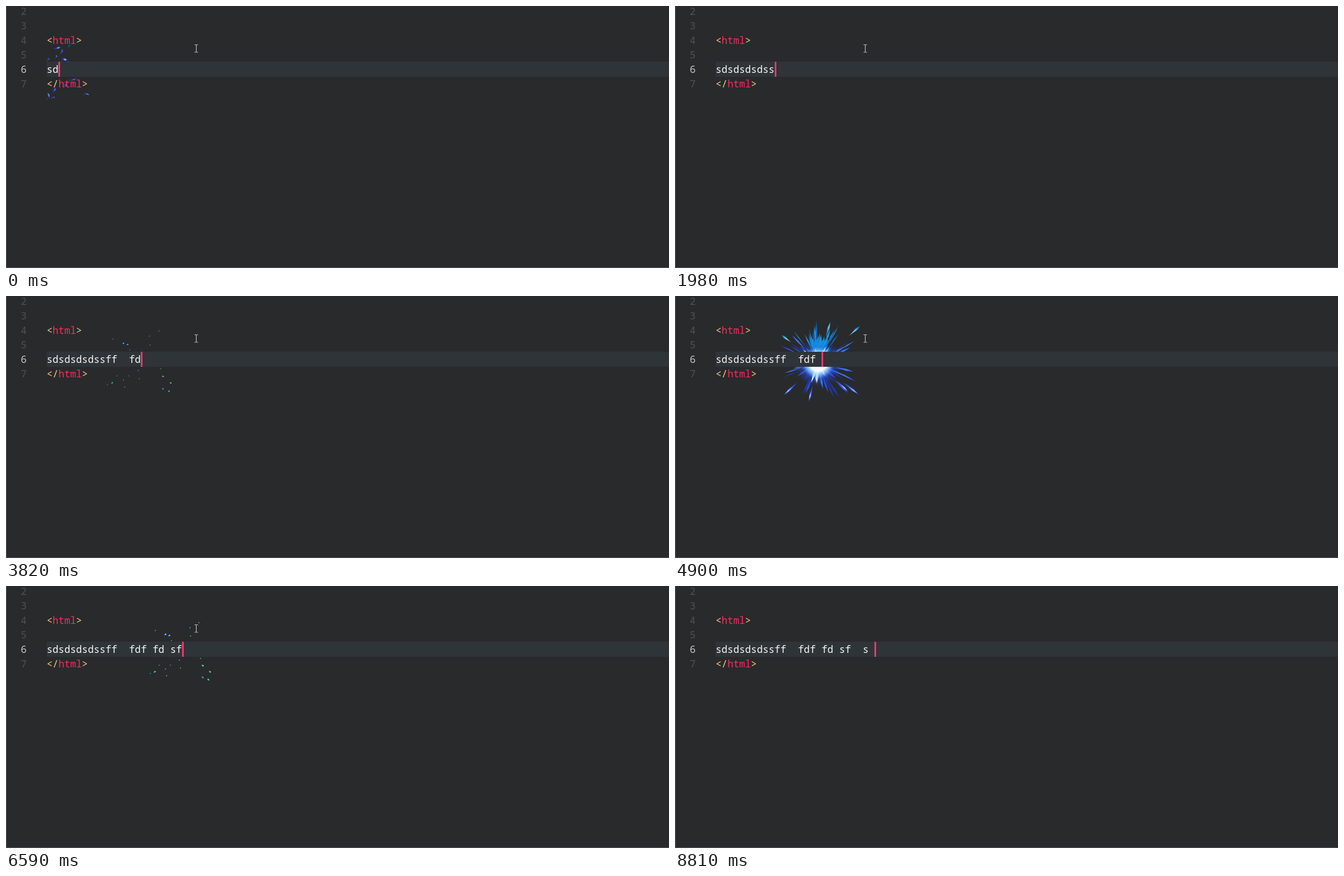
Write an HTML page with a canvas that moves like this. It is 1190x470 px and loops after 9200 ms.

```html
<!DOCTYPE html>
<html lang="en">
<head>
<meta charset="utf-8">
<title>Explosive typing</title>
<style>
  html, body { margin: 0; width: 100%; height: 100%; overflow: hidden; background: #292a2c; }
  canvas, svg { position: absolute; left: 0; top: 0; width: 1190px; height: 470px; }
  text { font: 17.6px "Noto Sans Mono", "DejaVu Sans Mono", monospace; white-space: pre; }
  .num { fill: #505153; }
  .on { fill: #c4c5c7; }
  .mark { fill: #ffc580; }
  .tag { fill: #f92b60; }
  #typed { fill: #f6f6f2; }
</style>
</head>
<body>
<canvas id="fx" width="1190" height="470"></canvas>
<svg viewBox="0 0 1190 470">
  <rect x="73" y="100" width="1117" height="27" fill="#2f3439"/>
  <rect width="1" height="470" fill="#55565a"/>
  <rect y="469" width="1190" height="1" fill="#55565a"/>
  <g id="gutter"></g>
  <text x="73" y="68" class="mark">&lt;<tspan class="tag">html</tspan>&gt;</text>
  <text x="73" y="146" class="mark">&lt;/<tspan class="tag">html</tspan>&gt;</text>
  <text id="typed" x="73" y="120"></text>
  <rect id="caret" y="100" width="3" height="27" fill="#f0386c"/>
  <path id="mouse" d="M338.5 69.5h2.5l.5 .5 .5-.5h2.5M341.5 70v12.500M338.500 83h2.500l.500-.500 .500 .500h2.500" fill="none" stroke="#d4d4d4"/>
</svg>
<script>
const LOOP = 9200, LIFE = 1100, CHAR = 10.56, LEFT = 73, MID = 120;
const BG = '#292a2c';
const LINE = 'sdsdsdsdssff  fdf fd sf  s ';

// Moments at which the 3rd, 4th, ... character appears
const KEYS = [270, 530, 790, 930, 1060, 1190, 1320, 1700, 2050, 2500, 3000, 3500,
  3670, 3800, 4390, 4640, 5170, 5440, 5700, 6130, 6430, 6850, 7270, 7650, 8150];
const BLASTS = [-825, 300, 780, 2014, 2772, 3875, 4650, 5570, 6690, 7640];
// Screen updates: [start, number of steps until the next start]
const BEATS = [[0, 1], [140, 8], [1200, 9], [2370, 9], [3540, 8], [4650, 8],
  [5750, 8], [6860, 8], [7920, 7], [8810, 1], [LOOP, 1]];

const BLUES = ['#1238c0', '#1b50e8', '#2769f8', '#3796ff', '#62d0ff', '#b4f0ff'];
const STREAKS = [[22, -74], [75, -66], [-62, 58], [-17, 69], [54, 52], [73, 57], [-66, -50]];
// x, y, width, height
const SHARDS = [[5, -45, 10, 4], [12, -39, 3, 10], [25, -49, 2, 5], [17, -24, 9, 6],
  [-12, -25, 3, 5], [24, -20, 5, 2], [-12, 40, 3, 13], [-1, 30, 4, 9], [-3, 44, 6, 3],
  [57, 38, 10, 2.5], [33, 12, 11, 3], [19, 22, 5, 7], [2, -30, 2, 6]];
const SPARKS = [[-42, -40], [-24, -33], [-17, -31], [-13, -22], [20, -45], [36, -54],
  [21, -30], [-51, 37], [-43, 34], [-22, 41], [-24, 29], [-15, 22], [3, 27], [43, 23],
  [56, 34], [43, 44], [53, 48], [1, 13], [39, 10], [-35, 22]];

const $ = id => document.getElementById(id);
const g = $('fx').getContext('2d');
const clamp = (v, a = 0, b = 1) => Math.min(b, Math.max(a, v));

function random(seed) {
  return () => {
    seed = (seed * 16807) % 2147483647;
    return seed / 2147483647;
  };
}

function glow(r, stops) {
  const fill = g.createRadialGradient(0, 0, 0, 0, 0, r);
  stops.forEach(([at, color]) => fill.addColorStop(at, color));
  g.fillStyle = fill;
  g.beginPath();
  g.arc(0, 0, r, 0, 7);
  g.fill();
}

function blob(x, y, w, h, turn, color) {
  g.fillStyle = color;
  g.beginPath();
  g.ellipse(x, y, w / 2, h / 2, turn, 0, 7);
  g.fill();
}

// Thin kite pointing away from the middle
function ray(a, r1, r2, w, color) {
  g.save();
  g.rotate(a);
  g.fillStyle = color;
  g.beginPath();
  g.moveTo(r1, 0);
  g.lineTo(r1 + (r2 - r1) * .6, -w / 2);
  g.lineTo(r2, 0);
  g.lineTo(r1 + (r2 - r1) * .6, w / 2);
  g.fill();
  g.restore();
}

function burst(p) {
  const rnd = random(41);
  const k = clamp(.25 + p * 3, 0, 1.04);
  g.globalAlpha = clamp((.42 - p) * 9);
  glow(44 * k, [[0, '#3c7cff'], [.5, '#2a5cf0cc'], [1, '#1c3cb000']]);
  for (let i = 0; i < 120; i++) {
    const a = rnd() * Math.PI * 2, far = rnd() ** 2;
    const up = Math.abs(a - 4.75) < .75;
    const color = up ? ['#1482d8', '#1a98ee', '#136cc0'][i % 3]
      : ['#2338b8', '#2f50e8', '#3c78ff', '#1c3a90'][i % 4];
    ray(a, (6 + far * 34) * k, (32 + far * 46) * k, 1.2 + rnd() * 2.2, color);
  }
  for (let i = 0; i < 13; i++) {
    ray(4.4 + i * .06, 8 * k, (40 + rnd() * 15) * k, 6, i % 2 ? '#1792e6' : '#137fd2');
  }
  STREAKS.forEach(([x, y], i) => {
    const a = Math.atan2(y, x), r = Math.hypot(x, y) * k;
    const short = i == 1 || i == 6;
    ray(a, r * (short ? .78 : .62), r, 4.5, y < 0 ? '#1d7fb4' : '#3157e0');
    ray(a, r * .74, r * .96, 2, y < 0 ? '#7fd8dc' : '#a0c4ff');
  });
  for (let i = 0; i < 26; i++) {
    ray(rnd() * 6.28, 4 * k, (20 + rnd() * 18) * k, 4, i % 3 ? '#7cc8ff' : '#e8f4ff');
  }
  glow(30 * k, [[0, '#fff'], [.5, '#f4faff'], [.75, '#8ccfffaa'], [1, '#3c7cff00']]);
}

function ring(p) {
  const rnd = random(97);
  const R = 42 + (p - .5) * 100;
  const wear = clamp((p - .5) / .2);
  g.globalAlpha = clamp((p - .34) * 12) * clamp((.73 - p) * 14);
  const pink = p > .53 ? '#f6dcff' : '#f4fcff';
  glow(R * .84, [[0, pink], [.4, '#e8f8ff'], [.62, '#6cd4ff'], [.84, '#2a78f6'], [1, '#1c4ce000']]);
  for (let i = 0; i < 24; i++) {
    const a = rnd() * 6.28, r = R * (.68 + rnd() * .16);
    blob(r * Math.cos(a), r * Math.sin(a), 4 + rnd() * 9, 3 + rnd() * 4, a + 1.3, BG);
  }
  for (let i = 0; i < 190; i++) {
    const a = rnd() * 6.28, d = rnd(), size = rnd(), tone = rnd();
    const gap = Math.sin(a * 3 + 1) + .6 * Math.sin(a * 7);
    if (gap < wear * 3.2 - 1.6) continue;
    const r = R * (.76 + d * .21);
    blob(r * Math.cos(a), r * Math.sin(a), 3 + size * 6, 1.5 + size * 2.5,
      a + 1.57 + (tone - .5) * 1.6, BLUES[Math.floor(tone * (d > .75 ? 3 : 6))]);
  }
  for (let i = 0; i < 46; i++) {
    const a = rnd() * 6.28, r = R * (.42 + rnd() * .3);
    blob(r * Math.cos(a), r * Math.sin(a), 3 + rnd() * 6, 2 + rnd() * 2, a,
      BLUES[2 + Math.floor(rnd() * 4)]);
  }
}

function shards(p) {
  const k = 1 + (p - .75) * .9;
  const fade = clamp((p - .64) * 14) * clamp((.85 - p) * 12);
  SHARDS.forEach(([x, y, w, h], i) => {
    const tilt = i % 2 ? .35 : -.3;
    g.globalAlpha = fade * .85;
    blob(x * k, y * k, w, h * .8, tilt, '#343fae');
    g.globalAlpha = fade;
    blob(x * k + 1, y * k, w * .55, h * .5, tilt, i % 3 ? '#4a5cf0' : '#8c9cff');
    blob(x * k - w * .6, y * k + h * .5, 1.5, 2, 0, '#3a46c0');
  });
}

function sparks(p) {
  const k = 1 + (p - .92) * 2;
  const size = clamp((1.06 - p) * 7, .3, 1.5);
  g.globalAlpha = clamp((p - .78) * 14);
  SPARKS.forEach(([x, y], i) => {
    const big = [1, 2, 8, 13, 14, 15, 16].includes(i) ? 1 : .55;
    const w = 5 * size * big, turn = Math.atan2(y, x) + (y < 0 && x < 0 ? 1.6 : 0);
    blob(x * k, y * k, w, w * .55, turn, i == 1 || i == 2 ? '#1c5cf0' : '#2c8a4c');
    blob(x * k + .6, y * k - .3, w * .6, w * .4, turn,
      ['#58d8e8', '#8ce0ff', '#b4e05c', '#3c8cff'][i % 4]);
  });
}

function hold(t) {
  t += 30;
  const i = BEATS.findLastIndex(b => b[0] <= t && b[0] < LOOP);
  const [from, steps] = BEATS[i], len = (BEATS[i + 1][0] - from) / steps;
  return from + Math.min(steps - 1, Math.floor((t - from) / len)) * len;
}

function draw(time) {
  const t = hold(time % LOOP);
  const n = 2 + KEYS.filter(k => k <= t).length;
  const x = LEFT + n * CHAR;
  const p = (t - BLASTS.findLast(b => b <= t)) / LIFE;

  $('typed').textContent = LINE.slice(0, n);
  $('caret').setAttribute('x', Math.round(x));
  $('mouse').style.display = t < 7920 ? '' : 'none';

  g.clearRect(0, 0, 1190, 470);
  if (p < 1) {
    g.save();
    g.beginPath();
    g.rect(LEFT, 41, 1117, 158);
    g.clip();
    g.translate(x - 6, MID);
    if (p < .42) burst(p);
    if (p > .34 && p < .73) ring(p);
    if (p > .64 && p < .85) shards(p);
    if (p > .78) sparks(p);
    g.restore();
  }
}

for (let n = 2; n < 8; n++) {
  $('gutter').innerHTML += `<text x="26.500" y="${16 + (n - 2) * 26}" class="num${n == 6 ? ' on' : ''}">${n}</text>`;
}

let begin;
function tick(now) {
  begin ??= now;
  draw(now - begin);
  requestAnimationFrame(tick);
}
draw(0);
requestAnimationFrame(tick);
</script>
</body>
</html>
```
